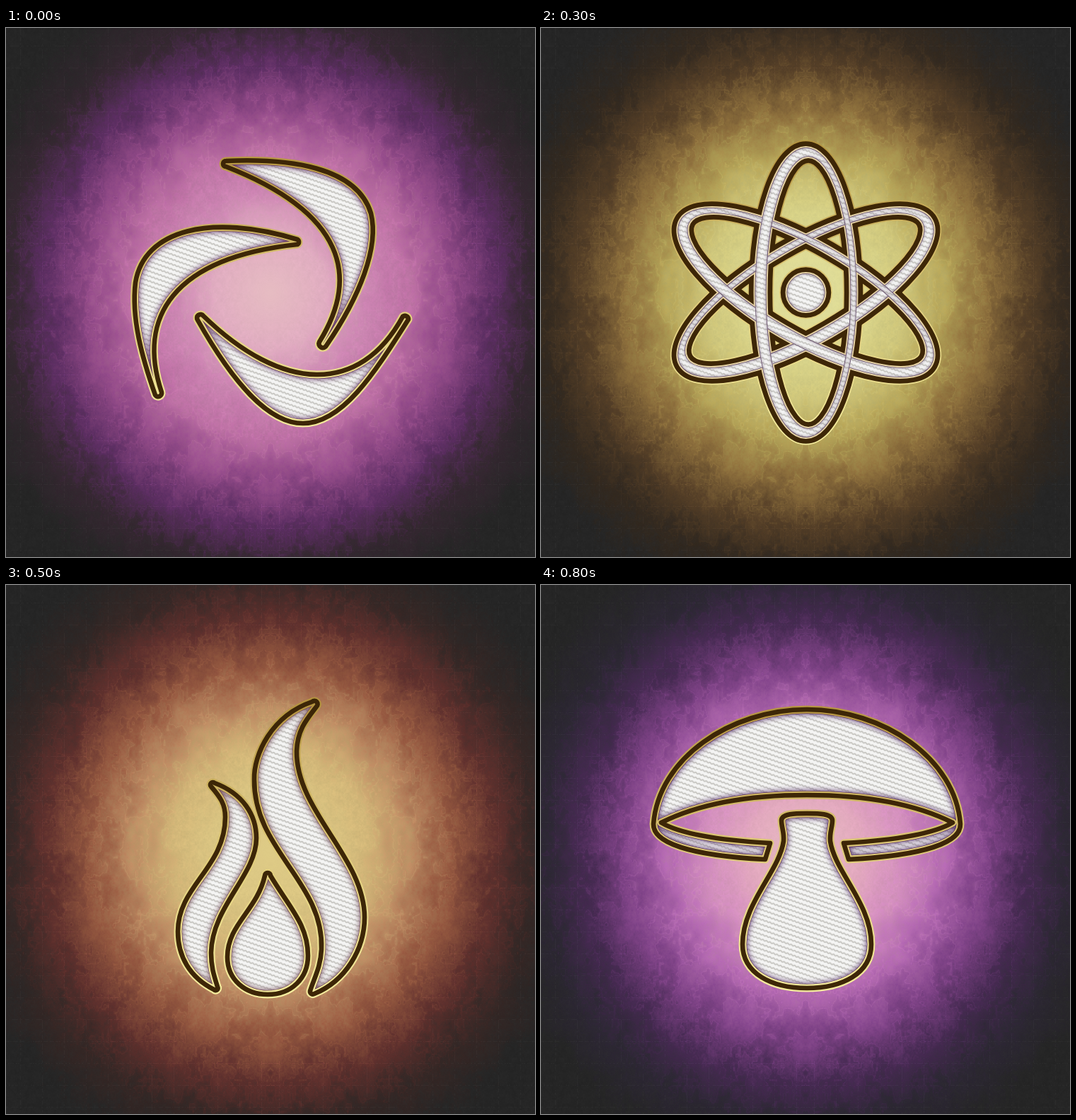
These frames come from a looping animation (748x748 px, 900 ms). An HTML page with a canvas:

```html
<!DOCTYPE html>
<html lang="en">
<head>
<meta charset="utf-8">
<title>Elements</title>
<style>
  html, body { margin: 0; width: 100%; height: 100%; overflow: hidden; background: #252525; }
  canvas { position: absolute; inset: 0; width: 100%; height: 100%; opacity: 0; }
</style>
</head>
<body>
<script>
const SIZE = 748, MID = 374, LOOP = 900, REACH = 560;
const RADII = [0, 80, 140, 200, 260, 320, 380, 450];
const BROWN = '#3d2607';

function makeCanvas(w, h) {
  const canvas = document.createElement('canvas');
  canvas.width = w;
  canvas.height = h;
  return canvas;
}

// ---- Weathered background: one shared, mirrored noise field ----
function hash(x, y) {
  let h = Math.imul(x, 374761393) ^ Math.imul(y, 668265263);
  h = Math.imul(h ^ (h >>> 13), 1274126177);
  return ((h ^ (h >>> 16)) >>> 0) / 4294967296;
}

function noise(x, y) {
  const ix = Math.floor(x), iy = Math.floor(y);
  const fx = x - ix, fy = y - iy;
  const u = fx * fx * (3 - 2 * fx), v = fy * fy * (3 - 2 * fy);
  const top = hash(ix, iy) * (1 - u) + hash(ix + 1, iy) * u;
  const low = hash(ix, iy + 1) * (1 - u) + hash(ix + 1, iy + 1) * u;
  return top * (1 - v) + low * v;
}

const depth = new Uint16Array(SIZE * SIZE);
const light = new Float32Array(SIZE * SIZE);

function buildField() {
  for (let y = 0; y < SIZE; y++) {
    for (let x = 0; x < MID; x++) {
      const r = Math.hypot(x - MID, (y - MID) * 0.97);
      const broad = noise(x / 30, y / 44) - 0.5;
      const mid = noise(x / 11 + 40, y / 16) - 0.5;
      const fine = noise(x / 4 + 90, y / 5) - 0.5;
      const grain = noise(x / 1.6, y / 1.9 + 30) - 0.5;
      const ridge = 1 - Math.abs(broad + mid * 0.7 + fine * 0.5) * 2;
      const vein = Math.max(0, ridge) ** 12;
      const edge = Math.min(1, r / 200);
      const shift = broad * 18 + mid * 18 + fine * 22 + grain * 20 - vein * 18 + 4;
      const d = Math.max(0, Math.min(REACH - 1, r + shift * edge));
      const weave = r > 290 && (x % 31 === 20 || y % 31 === 25) && grain > 0 ? 0.13 : 0;
      const l = 1 + (fine * 0.08 + grain * 0.08) * edge + weave;
      for (const px of [x, SIZE - 1 - x]) {
        depth[y * SIZE + px] = d;
        light[y * SIZE + px] = l;
      }
    }
  }
}

function paintBackground(ctx, colors) {
  const ramp = makeCanvas(REACH, 1).getContext('2d');
  const gradient = ramp.createLinearGradient(0, 0, REACH, 0);
  colors.split(' ').forEach((c, i) => gradient.addColorStop(RADII[i] / REACH, '#' + c));
  ramp.fillStyle = gradient;
  ramp.fillRect(0, 0, REACH, 1);
  const lut = ramp.getImageData(0, 0, REACH, 1).data;
  const image = ctx.createImageData(SIZE, SIZE);
  for (let i = 0; i < depth.length; i++) {
    const from = depth[i] * 4, to = i * 4;
    for (let k = 0; k < 3; k++) image.data[to + k] = lut[from + k] * light[i];
    image.data[to + 3] = 255;
  }
  ctx.putImageData(image, 0, 0);
}

// ---- Emblems ----
function fabric(ctx) {
  const tile = makeCanvas(20, 7), t = tile.getContext('2d');
  t.fillStyle = '#f4f4f3';
  t.fillRect(0, 0, 20, 7);
  t.strokeStyle = '#cbcac6';
  t.lineWidth = 2;
  for (let y = -14; y <= 14; y += 7) {
    t.beginPath();
    for (let x = -2; x <= 22; x++) {
      t.lineTo(x, y + x * 0.35 + Math.sin(x * Math.PI / 2.5) * 0.8);
    }
    t.stroke();
  }
  return ctx.createPattern(tile, 'repeat');
}

function gold(ctx) {
  const g = ctx.createLinearGradient(0, 165, 0, 585);
  g.addColorStop(0, '#b4933f');
  g.addColorStop(0.5, '#dfca78');
  g.addColorStop(1, '#f6ee9f');
  return g;
}

function stroke(ctx, path, style, width) {
  ctx.strokeStyle = style;
  ctx.lineWidth = width;
  ctx.stroke(path);
}

function fillCloth(ctx, path, tint, width, blur) {
  ctx.save();
  ctx.clip(path, 'evenodd');
  ctx.fillStyle = fabric(ctx);
  ctx.fill(path, 'evenodd');
  ctx.shadowColor = tint;
  ctx.shadowBlur = blur;
  stroke(ctx, path, tint, width);
  ctx.restore();
}

function drawBadge(ctx, path, tint) {
  fillCloth(ctx, path, tint, 12, 9);
  stroke(ctx, path, gold(ctx), 11);
  stroke(ctx, path, BROWN, 6.6);
}

function circle(r) {
  const p = new Path2D();
  p.arc(MID + 0.5, MID, r, 0, Math.PI * 2);
  return p;
}

function drawAtom(ctx, tint) {
  // Each ribbon lies between two ellipses with offset centres.
  const ribbon = (degrees, side) => {
    const ring = new Path2D(), p = new Path2D();
    ring.ellipse(0, 0, 72, 205, 0, 0, Math.PI * 2);
    ring.closePath();
    ring.moveTo(side * 3.5 + 59.5, 0);
    ring.ellipse(side * 3.5, 0, 59.5, 192, 0, 0, Math.PI * 2);
    p.addPath(ring, new DOMMatrix().translate(MID + 0.5, MID).rotate(degrees));
    return p;
  };
  const parts = [ribbon(60, -1), ribbon(-60, 1), ribbon(0, 1), circle(27)];
  const passes = [[gold(ctx), 21], [BROWN, 17.5], ['#e6d3a4', 4]];
  for (const [style, width] of passes) {
    for (const part of parts) stroke(ctx, part, style, width);
  }
  for (const part of parts) fillCloth(ctx, part, tint, 1.6, 4);
}

// Mirrored drop: tip, shoulder point, half width and its height, base.
function drop(tip, sx, sy, rx, wy, base) {
  const at = (dx, y) => `${375 + dx} ${y} `;
  const hx = sx + (rx - sx) * 0.75, hy = sy + (wy - sy) * 0.42;
  const upper = wy - (wy - sy) * 0.3, lower = wy + (base - wy) * 0.55;
  const flat = rx * 0.55;
  return `M${at(0, tip)}L${at(sx, sy)}` +
    `C${at(hx, hy)}${at(rx, upper)}${at(rx, wy)}` +
    `C${at(rx, lower)}${at(flat, base)}${at(0, base)}` +
    `C${at(-flat, base)}${at(-rx, lower)}${at(-rx, wy)}` +
    `C${at(-rx, upper)}${at(-hx, hy)}${at(-sx, sy)}Z`;
}

function drawSnow(ctx, tint) {
  const arm = new Path2D('M-23-73V-119L-57-151.5A19 19 0 0 1-30-178.5L-21-170V-186' +
    'A21 21 0 0 1 21-186V-170L30-178.5A19 19 0 0 1 57-151.5L23-119V-73Z');
  const flake = circle(54);
  for (let i = 0; i < 6; i++) {
    flake.addPath(arm, new DOMMatrix().translate(MID + 0.5, MID).rotate(i * 60));
  }
  drawBadge(ctx, flake, tint);
}

const badge = d => (ctx, tint) => drawBadge(ctx, new Path2D(d), tint);

const drawWater = badge(
  drop(170, 125, 375, 149, 445, 577) +
  drop(267, 84, 405, 104, 461, 547) +
  drop(331, 64, 428, 79, 475, 547));

const drawWind = badge(
  'M311 188C400 184 496 196 516 262C528 310 500 380 453 449A5 5 0 0 1 443 444' +
  'C500 352 480 262 311 196A4 4 0 0 1 311 188Z' +
  'M412 299C290 262 195 285 183 360C177 410 192 465 211 519A5 5 0 0 0 220 515' +
  'C185 410 235 325 412 306A4 4 0 0 0 412 299Z' +
  'M271 413C320 500 370 559 420 559C475 559 520 490 569 412A5 5 0 0 0 561 408' +
  'C500 520 390 515 279 407A5 5 0 0 0 271 413Z');

const drawFire = badge(
  'M433 165C375 185 350 240 351 275C350 375 450 420 446 515C445 540 436 555 430 574' +
  'A4 4 0 0 0 436 578C480 560 507 515 507 470C507 385 410 320 411 235' +
  'C412 205 425 190 439 172A4 4 0 0 0 433 165Z' +
  'M295 280C335 295 354 325 354 358C354 410 291 455 290 520C290 540 294 552 299 568' +
  'A3 3 0 0 1 294 572C260 555 243 525 243 490C243 425 310 400 310 328' +
  'C310 310 303 300 290 285A3 3 0 0 1 295 280Z' +
  'M366 411C355 460 313 480 313 526C313 558 338 579 370 579C404 579 427 556 427 524' +
  'C427 480 400 455 374 411A4 4 0 0 0 366 411Z');

const drawMushroom = badge(
  'M159 338C166 245 268 176 376 176C484 176 586 245 593 338C594 372 510 384 435 388' +
  'L428 365C480 362 550 355 582 336C520 305 440 297 376 297C312 297 232 305 170 336' +
  'C202 355 272 362 324 365L317 388C242 384 158 372 159 338Z' +
  'M340 333C340 323 360 323 376 323C392 323 412 323 412 333C412 342 408 350 409 362' +
  'C415 405 467 450 467 508C467 550 425 570 376 570C327 570 285 550 285 508' +
  'C285 450 337 405 343 362C344 350 340 342 340 333Z');

// ---- Scenes and timing ----
const scenes = [
  { at: 0, draw: drawWind, tint: '#5a2b60',
    colors: 'e6bcc2 e0acc0 cc86b2 bd70a4 924a88 5c2e62 342730 252525' },
  { at: 100, draw: drawWater, tint: '#232a45',
    colors: 'dcbcda cbaed6 a794c8 8478b4 5a5f9a 34506c 29363f 252525' },
  { at: 200, draw: drawAtom, tint: '#6b5570',
    colors: 'e2e0a0 dcd88f cfc77c b5a458 8c6e3c 553f27 33291f 252525' },
  { at: 400, draw: drawFire, tint: '#6a4050',
    colors: 'decb86 dac582 d2b678 bb8a62 93573f 5f302d 352725 252525' },
  { at: 600, draw: drawSnow, tint: '#2b6960',
    colors: 'cbdcde b9d6d4 98c8bc 74b09f 4b8b78 32614f 283b3c 252527' },
  { at: 800, draw: drawMushroom, tint: '#4b2362',
    colors: 'e8bec2 e2a8be d490be b268b0 7e4286 462a52 2c2733 252525' }
];

buildField();

const layers = scenes.map(({ draw, tint, colors }) => {
  const canvas = makeCanvas(SIZE, SIZE), ctx = canvas.getContext('2d');
  ctx.lineJoin = ctx.lineCap = 'round';
  paintBackground(ctx, colors);
  draw(ctx, tint);
  document.body.append(canvas);
  return canvas;
});

layers.forEach((layer, i) => {
  const start = scenes[i].at / LOOP;
  const end = i + 1 < scenes.length ? scenes[i + 1].at / LOOP : 1;
  const step = (offset, opacity) => ({ offset, opacity, easing: 'step-end' });
  const steps = [step(start, 1), step(end, 0)];
  if (start > 0) steps.unshift(step(0, 0));
  if (end < 1) steps.push(step(1, 0));
  layer.animate(steps, { duration: LOOP, iterations: Infinity });
});
</script>
</body>
</html>
```
